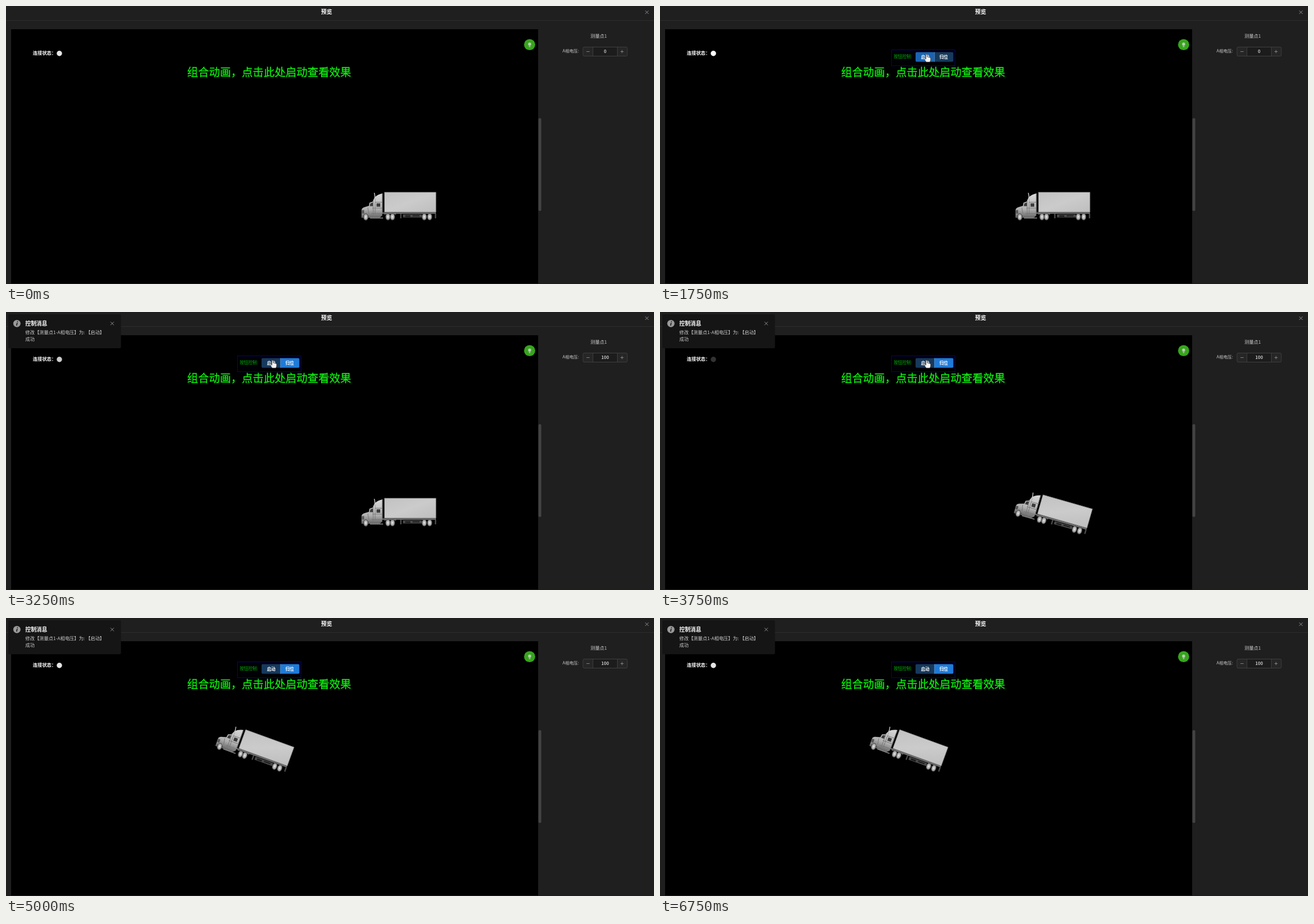
Write an HTML page that moves like this. It is 1141x491 px and loops after 7000 ms.

```html
<!DOCTYPE html>
<html lang="zh-CN">
<head>
<meta charset="utf-8">
<title>预览</title>
<style>
  html, body { margin: 0; width: 100%; height: 100%; overflow: hidden; background: #1f1f1f; }
  svg { display: block; width: 100%; height: 100%; }
  text { font: 8.2px "Noto Sans CJK SC", "Noto Sans CJK", sans-serif; fill: #fff; }
  .mid { text-anchor: middle; }
  .bold { font-weight: 700; }
  .soft { fill: #c8c8c8; }
  .small { font-size: 7.5px; }
  .heading { font-size: 19.25px; fill: #0fee0f; stroke: #0fee0f; stroke-width: .3px; }
</style>
</head>
<body>
<svg viewBox="0 0 1141 491">
  <defs>
    <linearGradient id="trailer" x2="1" y2="1">
      <stop stop-color="#c2c2c2"/><stop offset=".5" stop-color="#cbcbcb"/><stop offset="1" stop-color="#bebebe"/>
    </linearGradient>
    <linearGradient id="cab" x2="0" y2="1">
      <stop stop-color="#dadada"/><stop offset=".65" stop-color="#b0b0b0"/><stop offset="1" stop-color="#666"/>
    </linearGradient>
    <path id="cross" d="M-3-3 3 3M3-3-3 3" stroke="#999" stroke-width=".9"/>
    <g id="wheel">
      <ellipse rx="4.400" ry="6.300" fill="#555"/>
      <ellipse rx="3.200" ry="4.800" fill="#b4b4b4"/>
      <ellipse rx="1.400" ry="2" fill="#e0e0e0"/>
    </g>
  </defs>

  <!-- Dialog -->
  <rect width="1141" height="491" fill="#1f1f1f"/>
  <path d="M0 25.5H1141" stroke="#2d2d2d"/>
  <text class="mid bold" x="564.5" y="14" style="font-size:9.7px">预览</text>
  <use href="#cross" x="1128.500" y="11"/>
  <rect x="9" y="41" width="928" height="449" fill="#000"/>
  <rect x="937.500" y="198" width="5" height="164" rx="2.500" fill="#434343"/>

  <!-- Side panel -->
  <text class="mid soft" x="1043.500" y="56">测量点1</text>
  <text class="soft" x="980" y="82.300" style="font-size:7.4px">A相电压:</text>
  <rect x="1016" y="72.500" width="78" height="16" rx="2" fill="#262626" stroke="#454545" stroke-width=".8"/>
  <rect x="1033.500" y="72.500" width="43" height="16" fill="#1c1c1c" stroke="#454545" stroke-width=".8"/>
  <path d="M1022 80.500h5.500M1082 80.500h5.500M1084.750 77.750v5.500" stroke="#999" stroke-width=".8"/>
  <text id="voltage" class="mid soft small bold" x="1055" y="83.200">0</text>

  <!-- Canvas items -->
  <text class="bold" x="47.300" y="86.200">连接状态：</text>
  <circle id="lamp" cx="94" cy="83.700" r="4.700" fill="#fff"/>
  <circle cx="922" cy="68.300" r="9.800" fill="#38a41e"/>
  <path d="M920.700 70.200Q919.300 69 919.300 67.300A2.700 2.700 0 0 1 924.700 67.300Q924.700 69 923.300 70.200ZM920.700 71h2.600v1.400h-2.600Z" fill="#b9ccb4"/>
  <text class="heading" x="319" y="124.200">组合动画，点击此处启动查看效果</text>

  <g id="truck">
    <path d="M645 364.500H757V367H645Z" fill="#6c6c6c"/>
    <path d="M694 367h2.500v8H694zM699 368h33v5.500h-33zM755 367h2.500v8H755z" fill="#484848"/>
    <path d="M703 369.500h9v3h-9zM716 369.500h12v2h-12z" fill="#1c1c1c"/>
    <rect x="666.500" y="329" width="90.500" height="35" fill="url(#trailer)" stroke="#8c8c8c" stroke-width=".8"/>
    <path d="M626 374V361Q626 356.500 632 355L639 353 640 347.500 645.500 345.500 649 338Q654 333 662.500 331V370L658 374Z" fill="url(#cab)"/>
    <path d="M640.500 353.500 641.500 348.500 646 347V353.500ZM652.500 348.500h6.500v6h-6.500z" fill="#3c3c3c"/>
    <path d="M646.500 344V370M650 341V368M663 331V366M650 346.500H662M645 357H662M637 356 639 367M643 366.500H662" fill="none" stroke="#777" stroke-width=".9"/>
    <path d="M626.500 360.500h4v6h-4zM628 370h11v4h-11z" fill="#555"/>
    <path d="M649.500 346V335L648.500 330" fill="none" stroke="#bbb" stroke-width="1.500"/>
    <path d="M641 374.500H664" stroke="#888" stroke-width="1.600"/>
    <path d="M666 368Q676 363.500 687 368" fill="none" stroke="#777" stroke-width="1.300"/>
    <use href="#wheel" x="633.500" y="372.500"/>
    <use href="#wheel" x="672.500" y="372.300"/>
    <use href="#wheel" x="680.500" y="372.300"/>
    <use href="#wheel" x="736.500" y="372.300"/>
    <use href="#wheel" x="746" y="372.300"/>
  </g>

  <!-- Control popup -->
  <g id="popup">
    <rect x="407.500" y="77.500" width="112" height="28" fill="#000006" stroke="#06066a"/>
    <g id="controls">
      <text class="small" x="411.500" y="92.300" style="fill:#00b400">按钮控制:</text>
      <path id="startButton" d="M483 81.500H452Q450 81.500 450 83.500V96.500Q450 98.500 452 98.500H483Z"/>
      <path id="resetButton" d="M483 81.500H514.500Q516.500 81.500 516.500 83.500V96.500Q516.500 98.500 514.500 98.500H483Z"/>
      <path d="M483.300 81.500V98.500" stroke="#5a94cc" stroke-width=".8"/>
      <text class="mid small bold" x="467" y="92.800">启动</text>
      <text class="mid small bold" x="499.500" y="92.800">归位</text>
    </g>
    <g id="loading">
      <circle id="spinner" cx="464" cy="87" r="5" fill="none" stroke="#1c4d7c" stroke-dasharray="20 12"/>
      <text class="mid" x="464" y="100.200" style="fill:#2b72b2">拼命加载中</text>
    </g>
  </g>
  <path id="cursor" d="M-1.200 0Q0-1.300 1.200 0V4Q2.500 3.300 3.200 4.300Q4.700 3.800 5.200 5Q7 4.700 7 6.500V9.500L5.800 13H-.8L-3.700 8.500Q-4.200 6.500-1.200 7.500Z" fill="#f4f4f4" stroke="#333" stroke-width=".7"/>

  <!-- Notification -->
  <g id="notice">
    <rect id="noticeBox" x="4" y="4" width="198.500" rx="2.500" fill="#151515"/>
    <circle cx="19.200" cy="20.300" r="6.400" fill="#999"/>
    <path d="M19.800 19 18.600 24M20.300 16.300v1.400" stroke="#151515" stroke-width="1.500"/>
    <text class="bold" x="34" y="23.700" style="font-size:9.7px">控制消息</text>
    <text class="soft" x="34" y="38.500">修改【测量点1-A相电压】为: 【启动】</text>
    <text id="success" class="soft" x="34" y="51.300">成功</text>
    <use href="#cross" x="187" y="20.300"/>
  </g>
</svg>
<script>
  const LOOP = 7000, STEP = 250;
  const POPUP_AT = 1000, CLICK_AT = 2250, DONE_AT = 3250;
  const $ = id => document.getElementById(id);
  const progress = (t, from, to) => Math.min(1, Math.max(0, (t - from) / (to - from)));
  const show = (id, visible) => { $(id).style.display = visible ? "" : "none"; };
  const set = (id, name, value) => $(id).setAttribute(name, value);

  // Start time and brightness of each lamp state.
  const lampStates = [[0, .9], [1500, 1], [2500, .8], [3750, .2], [4000, .9]];

  function render(t) {
    const done = t >= DONE_AT;
    const loading = t >= CLICK_AT && !done;

    set("lamp", "opacity", lampStates.filter(([start]) => start <= t).pop()[1]);
    $("voltage").textContent = done ? 100 : 0;

    const turn = 20 * progress(t, 3350, 3850);
    const drive = progress(t, 3850, 4675);
    set("truck", "transform",
      `translate(${-254.5 * drive} ${-124.5 * drive}) rotate(${turn} 692 354)`);

    show("popup", t >= POPUP_AT);
    set("controls", "opacity", loading ? .22 : 1);
    set("startButton", "fill", done ? "#17395c" : "#1a64b2");
    set("resetButton", "fill", done ? "#1f7bd8" : "#163a5c");
    show("loading", loading);
    set("spinner", "transform", `rotate(${t * .18} 464 87)`);

    const reach = progress(t, POPUP_AT, 1500);
    show("cursor", t >= POPUP_AT && t < 4000);
    set("cursor", "transform", `translate(${462 + 7.5 * reach} ${112 - 26 * reach})`);

    const slide = 1 - (1 - progress(t, CLICK_AT, CLICK_AT + 300)) ** 3;
    set("notice", "transform", `translate(${-205 * (1 - slide)} 0)`);
    set("noticeBox", "height", done ? 60 : 47);
    show("success", done);
  }

  function tick() {
    const t = performance.now() % LOOP;
    render(Math.floor(t / STEP) * STEP);
    requestAnimationFrame(tick);
  }
  tick();
</script>
</body>
</html>
```
